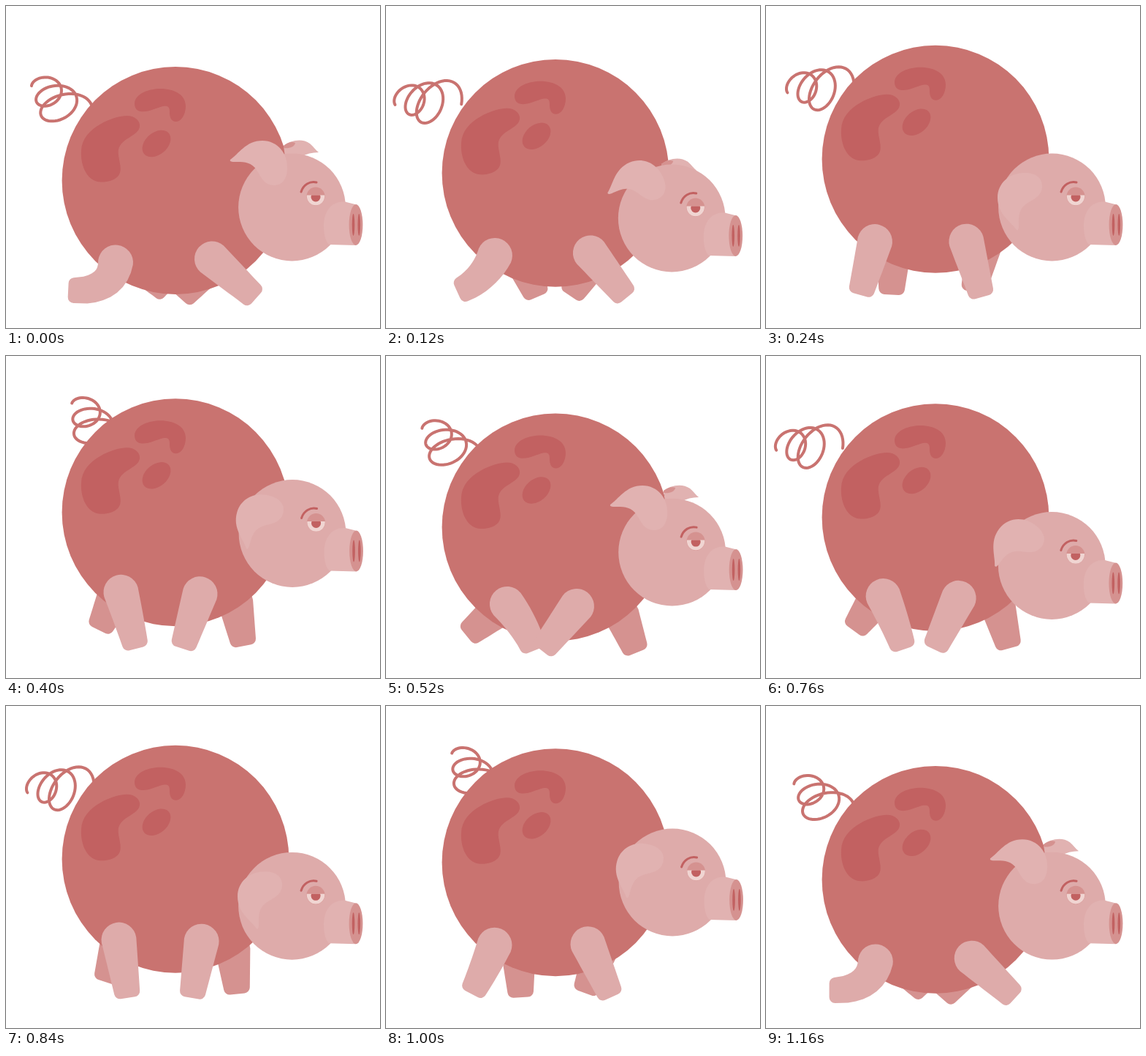
These frames come from a looping animation (512 px wide and 440 px high, 1200 ms). An HTML page with a canvas:

```html
<!DOCTYPE html>
<html lang="en">
<head>
<meta charset="utf-8">
<title>Walking pig</title>
<style>
html, body { margin: 0; width: 100%; height: 100%; overflow: hidden; background: #fff; }
canvas { display: block; }
</style>
</head>
<body>
<canvas id="stage" width="512" height="440"></canvas>
<script>
const ctx = document.getElementById('stage').getContext('2d');
const LOOP = 1200, STEP = 40, HALF = LOOP / 2, RAD = Math.PI / 180;
const SKIN = '#deabaa', LIGHT = '#e1b2b1', SHADE = '#d59290';
const BODY = '#c97370', SPOT = '#c26161', WHITE = '#f0d5d2';

// Periodic monotone cubic through keys of [time, ...values].
function track(keys, t, period) {
  const n = keys.length;
  t %= period;
  const key = k => keys[(k + n) % n];
  const time = k => key(k)[0] + period * Math.floor(k / n);
  let i = n - 1;
  while (keys[i][0] > t) i--;
  const h = time(i + 1) - time(i);
  const u = (t - time(i)) / h;
  const tangent = (p, q) => p * q <= 0 ? 0 : 2 * p * q / (p + q);
  return key(i).slice(1).map((b, j) => {
    const slope = k => (key(k + 1)[j + 1] - key(k)[j + 1]) / (time(k + 1) - time(k));
    const c = key(i + 1)[j + 1];
    const m0 = tangent(slope(i - 1), slope(i)) * h;
    const m1 = tangent(slope(i), slope(i + 1)) * h;
    return b + u * (m0 + u * (3 * (c - b) - 2 * m0 - m1 + u * (2 * (b - c) + m0 + m1)));
  });
}

function fill(color, path) {
  ctx.fillStyle = color;
  path ? ctx.fill(path) : ctx.fill();
}

function stroke(color, width, path) {
  ctx.strokeStyle = color;
  ctx.lineWidth = width;
  ctx.lineCap = 'round';
  path ? ctx.stroke(path) : ctx.stroke();
}

function ellipse(color, x, y, rx, ry = rx, turn = 0) {
  ctx.beginPath();
  ctx.ellipse(x, y, rx, ry, turn, 0, 2 * Math.PI);
  fill(color);
}

// Draws at an offset, optionally turned, and restores the canvas.
function placed(x, y, turn, paint) {
  ctx.save();
  ctx.translate(x, y);
  ctx.rotate(turn);
  paint();
  ctx.restore();
}

function bounce(t) {
  const p = 1 - Math.abs(t % HALF / (HALF / 2) - 1);
  return 238.5 - 31.8 * (p < 0.5 ? 2 * p * p : 1 - 2 * (1 - p) * (1 - p));
}

// Each coordinate is a mean plus harmonics of the step cycle; hip y is below the body centre.
const BACK = { hip: [[155, -9, 4], [110, 4, -2]], foot: [[148, -60], [395, -6]], knee: 1 };
const FRONT = { hip: [[271, 11], [110, 0, -3]], foot: [[275, 66], [398, -2, 2]], knee: 0 };
const FAR_BACK = { hip: [[165, 20, 2, -7], [117, -1, -4]], foot: [[159, 57, 6], [386, 9, 2, -7]], knee: 0 };
const FAR_FRONT = { hip: [[304, -21], [120, -4, -4]], foot: [[297, -53, -4], [396, -4, 6.5]], knee: 0 };

function drawLeg({ hip, foot, knee }, t, bodyY, color) {
  const phase = 2 * Math.PI * t / LOOP;
  const wave = terms => terms.reduce((sum, a, k) => sum + a * Math.cos(k * phase), 0);
  const [ax, dy] = hip.map(wave), [fx, fy] = foot.map(wave);
  const ay = bodyY + dy;
  const c = Math.cos(phase), bend = knee * c ** 4;
  const kx = (ax + fx) / 2 + bend * (16 + 10 * c);
  const ky = (ay + fy) / 2 + bend * (8 + 13 * c);
  const side = (s, sign) => {
    const r = 1 - s;
    const dx = r * (kx - ax) + s * (fx - kx), dy = r * (ky - ay) + s * (fy - ky);
    const w = sign * (24 - 6.8 * s) / Math.hypot(dx, dy);
    return [r * r * ax + 2 * r * s * kx + s * s * fx - dy * w,
      r * r * ay + 2 * r * s * ky + s * s * fy + dx * w];
  };
  const dir = Math.atan2(ky - ay, kx - ax), end = 1.025;
  ctx.beginPath();
  ctx.arc(ax, ay, 24, dir + Math.PI / 2, dir + Math.PI * 1.5);
  for (let k = 1; k <= 8; k++) ctx.lineTo(...side(k / 10, -1));
  ctx.arcTo(...side(end, -1), ...side(end, 1), 8);
  ctx.arcTo(...side(end, 1), ...side(0.8, 1), 8);
  for (let k = 8; k >= 0; k--) ctx.lineTo(...side(k / 10, 1));
  ctx.closePath();
  fill(color);
}

// Time, tilt in degrees, centre x, centre y from the body centre.
const TAIL = [[0, -21, 70, -108], [130, -60, 53, -98], [240, -61, 70, -97],
  [400, -7, 119, -120], [560, -20, 73, -109]];

// A coil of growing loops drifting along its axis.
function drawTail(t, bodyY) {
  const [tilt, x, y] = track(TAIL, t, HALF);
  placed(x, bodyY + y, tilt * RAD, () => {
    ctx.beginPath();
    for (let turn = 1.1; turn < 6.4; turn += 0.04) {
      const k = turn - 4, a = turn * Math.PI;
      ctx.lineTo(10.5 * k * Math.cos(70 * RAD) + (27 + 4 * k) * Math.cos(a),
        10.5 * k * Math.sin(70 * RAD) + (18.5 + 2 * k) * Math.sin(a));
    }
    stroke(BODY, 4);
  });
}

const patches = [
  'M103 198C104 165 150 150 165 150C178 150 184 158 183 165C181 178 158 180 154 196C152 208 162 224 153 233C145 241 130 242 122 239C108 233 102 215 103 198Z',
  'M176 133C177 119 197 113 211 113C232 113 246 122 246 137C246 148 240 158 233 158C225 158 224 150 224 145C224 138 222 136 215 137C206 139 194 146 184 144C178 143 176 138 176 133Z'
].map(d => new Path2D(d));

function drawBody(y) {
  ellipse(BODY, 232, y, 155.4);
  placed(0, y - 238.5, 0, () => {
    patches.forEach(p => fill(SPOT, p));
    ellipse(SPOT, 206, 188, 22, 15, -0.7);
  });
}

const HEAD = [[0, 275], [120, 290], [240, 275], [400, 242.5], [650, 297],
  [840, 273.3], [1000, 241], [1160, 273.2]];
const DROOP = [[0, 0], [60, 0], [240, 1], [400, 0.82], [510, 0]];

const ear = new Path2D('M307 210C318 203 328 184 351 184C372 184 386 202 385 222C385 236 378 245 367 245C353 245 349 233 343 224C335 212 324 213 312 213C308 213 306 212 307 210Z');
const farEar = new Path2D('M380 191C389 184 405 180 416 188C421 192 424 197 428 200C419 200 411 202 404 206L382 206Z');
const farEarFold = new Path2D('M380 191C386 186 391 185 396 187C395 193 387 195 380 194Z');
const brow = new Path2D('M404 254C407 244 416 239 425 241');
const snout = new Path2D('M478 271L464 267.5C446 266 435 280 435 300C435 314 438 322 442 326L479 327Z');

function drawEye() {
  ellipse(SHADE, 424, 260, 12.5);
  ctx.save();
  ctx.beginPath();
  ctx.rect(405, 258.5, 40, 20);
  ctx.clip();
  ellipse(WHITE, 424, 260, 12.2);
  ellipse(SPOT, 424, 261, 6.5);
  ctx.restore();
  stroke(SPOT, 3, brow);
}

function drawHead(t) {
  const [y] = track(HEAD, t, LOOP);
  const [droop] = track(DROOP, t, HALF);
  placed((275 - y) / 60, y - 275, 0, () => {
    placed(-10 * droop, 38 * droop, 0, () => {
      fill(LIGHT, farEar);
      fill(SHADE, farEarFold);
    });
    ellipse(SKIN, 391.5, 275, 73.4);
    placed(366 - 7 * droop, 226 + 21 * droop, -90 * RAD * droop, () => {
      ctx.translate(-366, -226);
      fill(LIGHT, ear);
    });
    drawEye();
    fill(LIGHT, snout);
    ellipse(SHADE, 479, 299, 9.4, 28);
    for (const x of [475.5, 483.3]) ellipse(SPOT, x, 299, 1.8, 15);
  });
}

function draw(t) {
  const y = bounce(t);
  ctx.fillStyle = '#fff';
  ctx.fillRect(0, 0, 512, 440);
  drawLeg(FAR_BACK, t, y, SHADE);
  drawLeg(FAR_FRONT, t, y, SHADE);
  drawTail(t, y);
  drawBody(y);
  drawHead(t);
  drawLeg(BACK, t, y, SKIN);
  drawLeg(FRONT, t, y, SKIN);
}

const start = performance.now();
function frame() {
  const t = (performance.now() - start) % LOOP;
  draw(Math.floor(t / STEP) * STEP);
  requestAnimationFrame(frame);
}
frame();
</script>
</body>
</html>
```
